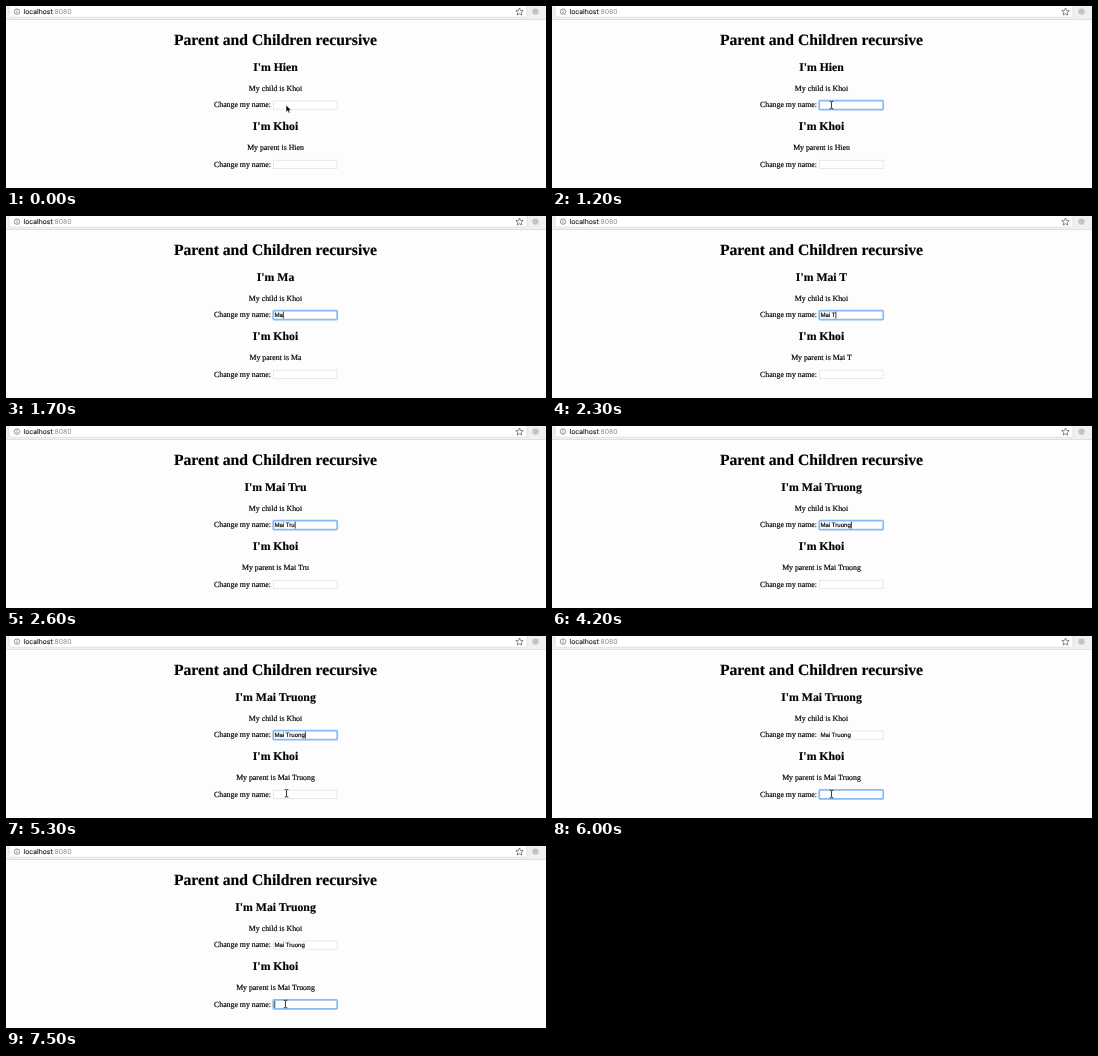
Recreate the animation shown at these times as an HTML page. Size 540x182 px, loop 8 s.

```html
<!DOCTYPE html>
<html lang="en">
<head>
<meta charset="utf-8">
<title>Parent and Children recursive</title>
<style>
html, body { margin: 0; width: 100%; height: 100%; overflow: hidden; background: #fdfdfd; }
svg { display: block; width: 540px; height: 182px; }
text { font-family: "Liberation Serif", Times, serif; font-size: 7.83px; fill: #000; stroke: #000; stroke-width: .16px; white-space: pre; text-rendering: geometricPrecision; }
.mid { text-anchor: middle; }
.h1 { font-size: 15.66px; font-weight: bold; }
.h2 { font-size: 11.75px; font-weight: bold; }
.typed { font-family: "Liberation Sans", Arial, sans-serif; font-size: 6.1px; }
.url { font-family: Inter, Roboto, sans-serif; font-size: 6.8px; fill: #222; stroke: #222; }
.port { fill: #8a8a8a; stroke: none; }
.box { fill: #fff; stroke: #e6e6e6; stroke-width: .9; }
.ring { fill: #fff; stroke: #85bcf6; stroke-width: 1.7; }
.beam { fill: none; stroke: #222; stroke-width: .9; }
</style>
</head>
<body>
<svg viewBox="0 0 540 182">
  <rect width="540" height="182" fill="#fdfdfd"/>

  <rect width="540" height="13.5" fill="#f0f0f0"/>
  <rect x="3" y="-4" width="518" height="15.2" rx="1.5" fill="#fff" stroke="#d9d9d9" stroke-width=".7"/>
  <rect y="13" width="540" height=".8" fill="#dadada"/>
  <circle cx="11" cy="5.6" r="2.7" fill="none" stroke="#777" stroke-width=".8"/>
  <path d="M11 5.2v2M11 3.8v.8" stroke="#777" stroke-width=".8"/>
  <text class="url" x="17.6" y="8">localhost<tspan class="port">:8080</tspan></text>
  <path d="M513.5 2l1.1 2.5 2.6.2-2 1.8.6 2.6-2.3-1.4-2.3 1.4.6-2.6-2-1.8 2.6-.2z" fill="none" stroke="#666" stroke-width=".8"/>
  <circle cx="529.5" cy="5.6" r="3.2" fill="#c4c4c4"/>

  <text class="mid h1" x="269.5" y="38.9">Parent and Children recursive</text>
  <text class="mid h2" x="269.5" y="64.9" id="title"></text>
  <text class="mid" x="269.5" y="84.6">My child is Khoi</text>
  <text x="208" y="101.3">Change my name:</text>
  <text class="mid h2" x="269.5" y="124.2">I'm Khoi</text>
  <text class="mid" x="269.5" y="144" id="parent"></text>
  <text x="208" y="160.7">Change my name:</text>

  <rect class="box" x="267.5" y="95" width="63.5" height="8.2"/>
  <rect class="box" x="267.5" y="154.3" width="63.5" height="8.2"/>
  <rect class="ring" id="ring" x="267.2" width="64" height="9" rx=".8"/>
  <text class="typed" x="268.4" y="101.2" id="typed"></text>
  <rect id="caret" width=".8" height="7" fill="#111"/>

  <g id="arrow"><path d="M0 0v7.2l1.7-1.5 1.1 2.5 1.3-.6-1.1-2.4h2.3z" fill="#000" stroke="#fff" stroke-width=".6"/></g>
  <g id="beam"><path class="beam" d="M-1.8-3.8Q0-3.8 0-2.8V2.8Q0 3.8-1.8 3.8M1.8-3.8Q0-3.8 0-2.8M0 2.8Q0 3.8 1.8 3.8"/></g>
</svg>
<script>
const LOOP = 8000;
const FULL = "Mai Truong";
const keyTimes = [1500, 1700, 1900, 2000, 2300, 2500, 2600, 2800, 2900, 3200];

// time, pointer kind, x, y
const pointer = [
  [0, "arrow", 280, 99],
  [400, "beam", 280.3, 100],
  [500, "beam", 279.5, 99],
  [1500, "", 0, 0],
  [4400, "arrow", 285, 114],
  [4500, "arrow", 284.5, 140],
  [4600, "arrow", 283, 160],
  [4700, "arrow", 282, 165.5],
  [4900, "arrow", 281.8, 164.5],
  [5000, "arrow", 281.5, 163],
  [5100, "beam", 281, 160],
  [5200, "beam", 280.7, 158.5],
  [5300, "beam", 280.5, 157.3],
  [5800, "beam", 280, 157.6],
  [6000, "beam", 279.5, 158]
];

const $ = id => document.getElementById(id);
const [title, parent, typed, ring, caret, arrow, beam] =
  ["title", "parent", "typed", "ring", "caret", "arrow", "beam"].map($);

function show(el, on) {
  el.setAttribute("visibility", on ? "visible" : "hidden");
}

function setText(el, value) {
  if (el.textContent !== value) el.textContent = value;
}

function drawPointer(t) {
  const [, kind, x, y] = pointer.filter(p => p[0] <= t).pop();
  for (const el of [arrow, beam]) {
    show(el, el.id === kind);
    el.setAttribute("transform", `translate(${x} ${y})`);
  }
}

function blink(t, start) {
  return Math.floor((t - start) / 500) % 2 === 0;
}

function caretOn(t) {
  if (t < 700) return false;
  if (t < 1500) return blink(t, 700);
  if (t < 3200) return true;
  return blink(t, t < 5500 ? 3200 : 5500);
}

function draw(now) {
  const t = now % LOOP;
  const value = FULL.slice(0, keyTimes.filter(k => k <= t).length);
  const name = value.trim() || "Hien";
  const second = t >= 5500;

  setText(title, "I'm " + name);
  setText(parent, "My parent is " + name);
  setText(typed, value);

  show(ring, t >= 700);
  ring.setAttribute("y", second ? 153.9 : 94.6);

  const width = second || !value ? 0 : typed.getComputedTextLength();
  caret.setAttribute("x", 268.4 + width);
  caret.setAttribute("y", second ? 154.9 : 95.6);
  show(caret, caretOn(t));

  drawPointer(t);
}

function tick() {
  draw(performance.now());
  requestAnimationFrame(tick);
}
tick();
</script>
</body>
</html>
```
